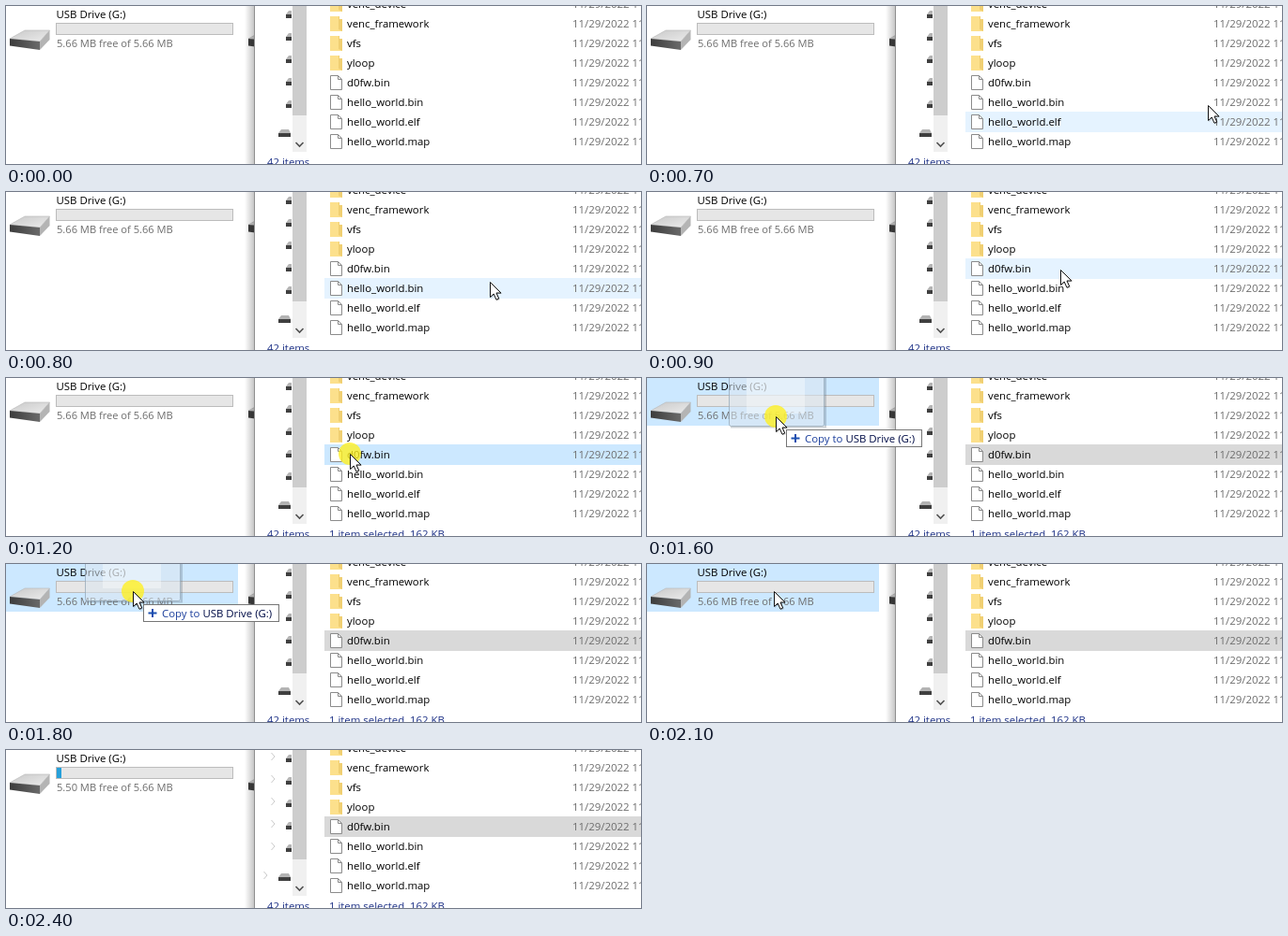
Write an HTML page that moves like this. It is 676 px wide and 169 px high and loops after 4110 ms.

```html
<!DOCTYPE html>
<html lang="en">
<head>
<meta charset="utf-8">
<title>Copying a file to a drive</title>
<style>
  html, body { margin: 0; width: 100%; height: 100%; overflow: hidden; background: #fff; }
  svg { display: block; width: 676px; height: 169px; }
  text { font: 11.4px "Open Sans", "Noto Sans", sans-serif; fill: #000; white-space: pre; }
  .dim { fill: #6d6d6d; }
  .small { font-size: 11.1px; }
  .status { fill: #1e3287; }
  .line { fill: none; stroke-linecap: butt; }
</style>
</head>
<body>
<svg viewBox="0 0 676 169">
  <defs>
    <linearGradient id="lid" x2="1" y2="1">
      <stop stop-color="#c9c9c9"/><stop offset="1" stop-color="#ececec"/>
    </linearGradient>
    <linearGradient id="face" x2="1">
      <stop stop-color="#3c3c3c"/><stop offset="1" stop-color="#6a6a6a"/>
    </linearGradient>
    <linearGradient id="edge">
      <stop stop-opacity="0"/><stop offset="1" stop-opacity=".22"/>
    </linearGradient>
    <g id="drive">
      <path d="M4 35L20 26H46.500L36 38Z" fill="url(#lid)" stroke="#b5b5b5" stroke-width=".6"/>
      <path d="M4 35L36 38V47L4 42.500Z" fill="url(#face)"/>
      <path d="M36 38L46.500 26V36L36 47Z" fill="#b4b4b4"/>
    </g>
    <g id="mini">
      <path d="M0 0L3 -4H11L13 0Z" fill="#b4b4b4"/>
      <path d="M0 0H13V4H0Z" fill="#3f3f3f"/>
    </g>
    <g id="folder">
      <path d="M345 -8H355V-5H358V8H345Z" fill="#f0cf72"/>
      <path d="M345 -8H354V6L358 8H345Z" fill="#fce08c"/>
    </g>
    <g id="file">
      <path d="M345.5 -7.5H353.5L357.5 -3.5V7.5H345.5Z" fill="#fff" stroke="#8b8b8b"/>
      <path class="line" d="M353.5 -7.5V-3.5H357.5" stroke="#8b8b8b"/>
    </g>
    <clipPath id="nav"><path d="M265 0H304V158H265Z"/></clipPath>
  </defs>

  <rect width="676" height="169" fill="#fff"/>
  <rect id="target" width="247" height="51" fill="#cce8ff"/>
  <use href="#drive"/>
  <text x="53.5" y="13">USB Drive (G:)</text>
  <rect x="53.5" y="18.5" width="188" height="12" fill="#e6e6e6" stroke="#bcbcbc"/>
  <rect id="used" x="54" y="19" width="5" height="11" fill="#26a0da"/>
  <text id="space" class="dim small" x="54" y="43.5"></text>
  <use href="#drive" x="254"/>

  <rect x="254" width="10" height="169" fill="url(#edge)"/>
  <rect x="264" width="412" height="169" fill="#fff"/>
  <path d="M264.5 0V169" stroke="#8f8f8f"/>
  <g id="tree" clip-path="url(#nav)"></g>
  <g id="arrows" class="line" stroke="#a6a6a6"></g>
  <rect x="305" width="15" height="156" fill="#f0f0f0"/>
  <rect x="305" width="15" height="117" fill="#cdcdcd"/>
  <path class="line" d="M308.5 146L312.5 150L316.5 146" stroke="#505050" stroke-width="1.6"/>
  <rect id="row" x="339" width="337" height="22"/>
  <g id="list"></g>
  <text class="status" x="278" y="171">42 items</text>
  <text id="picked" class="status" x="344" y="171">1 item selected, 162 KB</text>

  <g id="ghost">
    <path class="line" d="M2 92.500H103V-20" stroke="#5a6a78" stroke-width="2" opacity=".3"/>
    <rect id="pane" x=".5" y="-20" width="101" height="111.5" rx="2" stroke="#8fa3b2" stroke-opacity=".7"/>
    <rect x="19" y="-20" width="62" height="98" fill="#fff" opacity=".35"/>
  </g>
  <path id="move" class="line" d="M372 102.5H384M379 97.5L384 102.5L379 107.5" stroke="#4a90dc" stroke-width="2"/>
  <g id="tip">
    <rect x=".5" y=".5" width="144" height="18" fill="#fff" stroke="#767676"/>
    <path d="M5.5 9.5H14.5M10 5V14" stroke="#1c4fb0" stroke-width="2"/>
    <text x="20" y="13.5"><tspan fill="#1c3f9c">Copy to </tspan><tspan fill="#000c46">USB Drive (G:)</tspan></text>
  </g>
  <g id="mouse">
    <circle id="press" r="12" fill="#fff01e" opacity=".78"/>
    <path d="M1 1V18L5 14.2L8 20.5L11 19L8.200 13H13.500Z" fill="#000" opacity=".18"/>
    <path d="M.5 .5V16.500L4.200 13L7 19.300L9.700 18L7 12H12Z" fill="#fff" stroke="#111"/>
  </g>
</svg>
<script>
const LOOP = 4110;
const $ = id => document.getElementById(id);
const show = (id, on) => $(id).setAttribute("visibility", on ? "visible" : "hidden");
const move = (id, x, y) => $(id).setAttribute("transform", `translate(${x} ${y})`);
const rowY = i => 21 * i - 2;

const names = ["venc_device", "venc_framework", "vfs", "yloop",
  "d0fw.bin", "hello_world.bin", "hello_world.elf", "hello_world.map"];
$("list").innerHTML = names.map((name, i) => `
  <use href="#${i < 4 ? "folder" : "file"}" y="${rowY(i)}"/>
  <text x="363" y="${rowY(i) + 4}">${name}</text>
  <text class="dim" x="603" y="${rowY(i) + 4}">11/29/2022 11:30</text>`).join("");

// Five nested drives, then one a level up after a small gap.
for (let i = 0; i < 6; i++) {
  const last = i === 5, y = 9 + 24 * i + (last ? 7 : 0);
  $("tree").innerHTML += `<use href="#mini" x="${last ? 290 : 298}" y="${y}"/>`;
  $("arrows").innerHTML += `<path d="M${last ? 274.5 : 282.5} ${y - 6}l3.500 4l-3.500 4"/>`;
}

const HOVER = "#e5f3ff", ACTIVE = "#cce8ff", IDLE = "#d9d9d9";
const BLUE = "rgba(204,232,247,.5)", PALE = "rgba(220,232,240,.55)";

// Each pose holds until the next; fields not given are off.
const poses = [
  { at: 0 },
  { at: 700, mouse: [597, 106], row: 6, fill: HOVER },
  { at: 800, mouse: [515, 96], row: 5, fill: HOVER },
  { at: 900, mouse: [440, 83], row: 4, fill: HOVER },
  { at: 1000, mouse: [398, 82], row: 4, fill: HOVER },
  { at: 1100, mouse: [372, 82], row: 4, fill: HOVER },
  { at: 1200, mouse: [366, 81], row: 4, fill: ACTIVE, press: 1 },
  { at: 1300, mouse: [361, 81], row: 4, fill: IDLE, press: 1 },
  { at: 1400, mouse: [346, 81], row: 4, fill: IDLE, press: 1, ghost: [309, -1], pane: BLUE, move: 1 },
  { at: 1500, mouse: [232, 60], row: 4, fill: IDLE, press: 1, ghost: [188, -21], pane: BLUE },
  { at: 1600, mouse: [137, 41], row: 4, fill: IDLE, press: 1, ghost: [87, -40], pane: PALE, tip: 1, target: 1 },
  { at: 1700, mouse: [136, 33], row: 4, fill: IDLE, press: 1, ghost: [85, -48], pane: PALE, tip: 1, target: 1 },
  { at: 1800, mouse: [135, 29], row: 4, fill: IDLE, press: 1, ghost: [84, -52], pane: PALE, tip: 1, target: 1 },
  { at: 2100, mouse: [135, 29], row: 4, fill: IDLE, target: 1 },
  { at: 2200, row: 4, fill: IDLE, used: 1, arrows: .3 },
  { at: 2400, row: 4, fill: IDLE, used: 1, arrows: .6 }
];

function draw(p) {
  for (const id of ["mouse", "row", "ghost", "move", "tip", "target", "used", "arrows"]) show(id, p[id]);
  show("press", p.press);
  show("picked", p.at >= 1200);
  $("space").textContent = `${p.used ? "5.50" : "5.66"} MB free of 5.66 MB`;
  if (p.row) {
    $("row").setAttribute("y", rowY(p.row) - 11);
    $("row").setAttribute("fill", p.fill);
  }
  if (p.arrows) $("arrows").setAttribute("opacity", p.arrows);
  if (p.mouse) {
    const [x, y] = p.mouse;
    move("mouse", x, y);
    move("tip", x + 11, y + 14);
  }
  if (p.ghost) {
    move("ghost", ...p.ghost);
    $("pane").setAttribute("fill", p.pane);
  }
}

let shown;
function tick() {
  const t = performance.now() % LOOP;
  const pose = poses.findLast(p => p.at <= t);
  if (pose !== shown) draw(shown = pose);
  requestAnimationFrame(tick);
}
tick();
</script>
</body>
</html>
```
